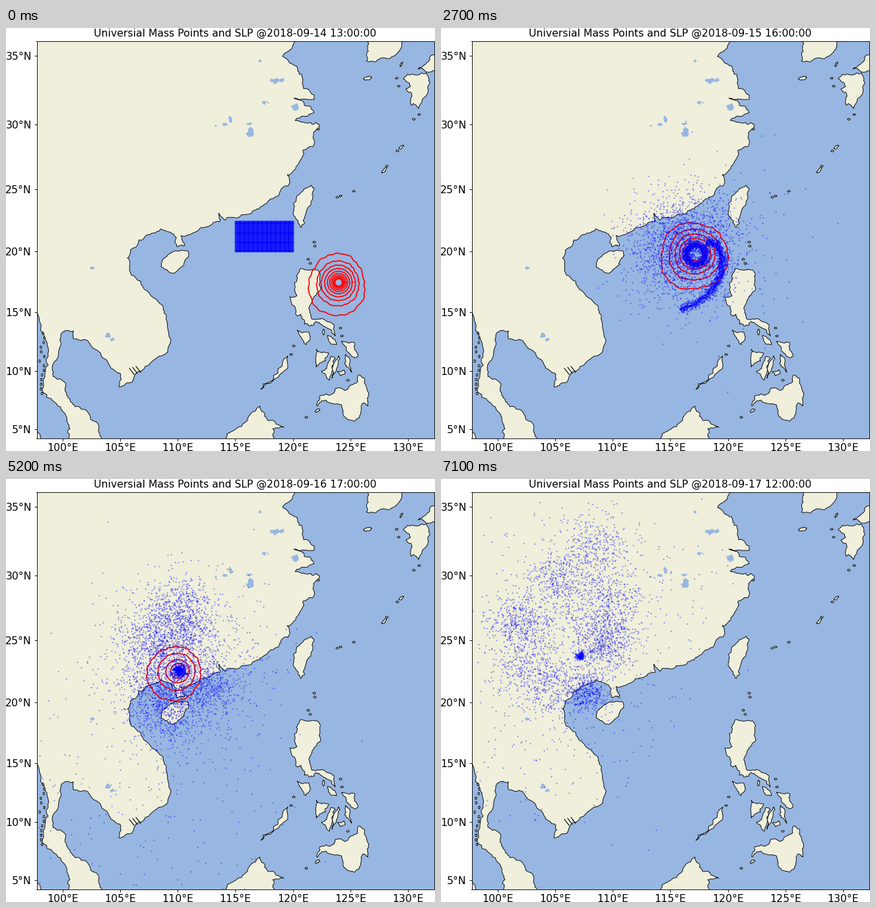
A matplotlib script for the animation above (7.2 s loop, 650 by 640 pixels).

```python
import numpy as np
import matplotlib.pyplot as plt
from matplotlib.animation import FuncAnimation

W, H, DPI = 650, 640, 80
FRAMES, INTERVAL = 72, 100
TAU = 2 * np.pi
OCEAN, LAND = "#97b6e1", "#efefdb"
rng = np.random.default_rng(7)


def lon_x(lon):
    return 86 + 17.43 * (np.asarray(lon) - 100)


def lat_y(lat):
    merc = np.log(np.tan(np.pi / 4 + np.radians(lat) / 2))
    return 607 - 998.5 * (merc - 0.0874)


# ---- map, in stage pixels ----
CHINA = [
    (30, 10), (438, 10), (438, 20), (419, 43), (433, 54), (444, 70), (451, 92),
    (467, 108), (436, 106), (460, 118), (467, 128), (438, 140), (464, 146),
    (475, 147), (466, 158), (466, 178), (450, 185), (449, 195), (434, 218),
    (426, 222), (430, 234), (415, 248), (397, 262), (383, 274), (366, 282),
    (332, 291), (322, 280), (324, 293)]
INDOCHINA = [
    (300, 302), (265, 314), (270, 330), (259, 331), (258, 317), (248, 309),
    (234, 304), (212, 314), (196, 332), (184, 348), (187, 366), (207, 391),
    (233, 417), (243, 436), (249, 470), (245, 490), (211, 512), (186, 537),
    (171, 543), (174, 524), (158, 512), (140, 489), (124, 473), (102, 470)]
MALAYA = [
    (102, 458), (86, 460), (83, 480), (70, 514), (71, 527), (82, 531), (92, 556),
    (101, 569), (119, 577), (141, 604), (146, 630), (96, 630), (97, 606), (91, 587),
    (70, 563), (55, 546), (64, 510), (62, 475), (45, 425), (30, 420)]
HAINAN = [(236, 362), (237, 351), (251, 340), (275, 337), (277, 343), (264, 363),
          (250, 371)]
TAIWAN = [(462, 238), (467, 243), (465, 254), (452, 288), (447, 302), (436, 284),
          (437, 270), (452, 243)]
LUZON = [
    (446, 364), (472, 366), (477, 395), (464, 411), (460, 430), (470, 441),
    (480, 440), (497, 449), (499, 466), (485, 453), (470, 444), (466, 450),
    (452, 448), (447, 433), (442, 436), (430, 407), (441, 405), (441, 380)]
MINDORO = [(441, 457), (459, 460), (461, 470), (455, 479)]
SAMAR = [(508, 474), (528, 476), (533, 497), (520, 492)]
LEYTE = [(514, 494), (521, 501), (524, 521), (513, 508)]
MASBATE = [(487, 465), (501, 479), (491, 476)]
PANAY = [(470, 486), (489, 492), (484, 504), (470, 513)]
NEGROS = [(492, 497), (499, 500), (490, 533), (478, 519), (486, 515)]
CEBU = [(504, 496), (506, 500), (494, 530)]
BOHOL = [(502, 520), (512, 517), (514, 523), (507, 526)]
MINDANAO = [
    (536, 525), (543, 530), (549, 556), (548, 572), (541, 567), (535, 590),
    (528, 595), (510, 582), (508, 570), (485, 563), (471, 572), (475, 557),
    (496, 553), (500, 545), (515, 548), (533, 535)]
PALAWAN = [(427, 496), (418, 512), (386, 547), (413, 528), (427, 514)]
BORNEO = [(329, 630), (335, 614), (357, 603), (372, 582), (385, 572), (387, 580),
          (397, 594), (421, 604), (404, 606), (404, 630)]
SUMATRA = [(30, 590), (46, 606), (58, 630), (30, 630)]
KOREA = [(546, 5), (548, 30), (546, 50), (560, 51), (592, 39), (601, 5)]
KYUSHU = [(602, 77), (608, 70), (637, 68), (642, 84), (625, 122), (614, 117),
          (614, 98), (606, 92), (613, 88)]
HONSHU = [(624, 62), (640, 51), (660, 38), (660, 66), (634, 64)]
# long islands: x, y, length, width, angle
LONG_ISLES = [(548, 76, 13, 5, 15), (599, 55, 8, 2, 60), (599, 180, 9, 3, 35),
              (573, 215, 11, 3, 50), (472, 579, 8, 4, 30), (481, 460, 9, 3, 90)]
SMALL_ISLES = [(626, 131), (618, 138), (593, 186), (577, 209), (502, 256), (507, 254),
               (527, 247), (467, 324), (468, 330), (458, 350), (461, 356), (436, 481),
               (432, 494), (455, 589), (507, 454), (509, 466), (473, 153), (518, 533),
               (592, 76), (595, 88)]
# lakes: x, y, length, width
LAKES = [(385, 50, 5, 4), (410, 79, 24, 8), (393, 113, 11, 4), (438, 120, 11, 10),
         (340, 138, 6, 10), (332, 146, 8, 4), (318, 148, 4, 3), (369, 145, 9, 4),
         (370, 158, 10, 17), (154, 465, 8, 8), (161, 472, 7, 5), (131, 363, 7, 4)]


def rough(points, amp=0.13, levels=3):
    """Roughen a closed outline by moving edge midpoints sideways."""
    p = np.array(points, float)
    for _ in range(levels):
        q = np.roll(p, -1, 0)
        d = q - p
        size = np.hypot(d[:, 0], d[:, 1])
        d *= (np.minimum(size, 14) / np.maximum(size, 1e-9))[:, None]
        side = np.column_stack([-d[:, 1], d[:, 0]])
        mid = (p + q) / 2 + side * rng.normal(0, amp, (len(p), 1))
        p = np.stack([p, mid], 1).reshape(-1, 2)
    return p


def oval(x, y, length, width, angle=0):
    t = np.linspace(0, TAU, 8, endpoint=False)
    u, v = length / 2 * np.cos(t), width / 2 * np.sin(t)
    a = np.radians(angle)
    return np.column_stack([x + u * np.cos(a) - v * np.sin(a),
                            y - u * np.sin(a) - v * np.cos(a)])


def draw_map(ax):
    lands = [CHINA + INDOCHINA + MALAYA, HAINAN, TAIWAN, LUZON, MINDORO, SAMAR, LEYTE,
             MASBATE, PANAY, NEGROS, CEBU, BOHOL, MINDANAO, PALAWAN, BORNEO, SUMATRA,
             KOREA, KYUSHU, HONSHU]
    lands += [oval(*isle) for isle in LONG_ISLES]
    lands += [oval(x, y, 4, 2.5) for x, y in SMALL_ISLES]
    lands += [oval(rng.uniform(51, 59), y, 2.5, 4) for y in range(462, 560, 7)]
    for pts in lands:
        ax.fill(*rough(pts).T, fc=LAND, ec="black", lw=0.8, zorder=1)
    for lake in LAKES:
        ax.fill(*rough(oval(*lake), 0.3, 2).T, fc=OCEAN, lw=0, zorder=1.2)
    for k in range(3):
        x, y = 187 + 5 * k, 515 - 1.5 * k
        ax.plot([x, x + 7], [y, y + 9], color="black", lw=1, zorder=1.3)


# ---- storm ----
KEYS = np.array([0, 11, 27, 44, 52, 63, 71])
EYE = np.array([(504, 385), (445, 375), (385, 341), (307, 299), (261, 290),
                (226, 285), (211, 267)], float)
RING_KEYS = [0, 11, 27, 44, 52, 63, 66]
# outermost isobar: radius every 45 degrees, counterclockwise from east
OUTER = np.array([
    [39, 40, 44, 43, 45, 50, 50, 46],
    [58, 53, 52, 50, 47, 46, 55, 57],
    [50, 46, 46, 50, 51, 57, 54, 53],
    [40, 40, 39, 50, 72, 72, 65, 52],
    [34, 34, 36, 40, 47, 49, 45, 38],
    [3, 5, 7, 9, 8, 7, 5, 3],
    [1] * 8], float)
# inner isobars: largest radius, ratio, smallest radius
INNER = np.array([(33, 0.8, 5), (41, 0.77, 8), (39, 0.78, 9), (38, 0.8, 12),
                  (28, 0.63, 10), (0, 0.6, 9), (0, 0.6, 9)])
ANGLE = np.linspace(0, TAU, 96, endpoint=False)


def columns_at(t, keys, table):
    return np.array([np.interp(t, keys, col) for col in table.T])


def isobars(t):
    outer = columns_at(t, RING_KEYS, OUTER)
    first, ratio, least = columns_at(t, RING_KEYS, INNER)
    shape = np.fft.irfft(np.fft.rfft(outer / outer.mean()), 96) * 12
    cx, cy = columns_at(t, KEYS, EYE)
    radii = [outer.mean(), *first * ratio ** np.arange(9)]
    curves = []
    for j, r in enumerate(radii):
        if r < (least if j else 3):
            curves.append(([], []))
            continue
        wave = sum(np.sin(k * ANGLE + k * k + 2 * j + 0.35 * t) for k in (7, 11, 17, 23))
        rad = r * (1 + (shape - 1) * 0.6 ** j) + 0.5 * 0.7 ** j * min(1, r / 30) * wave
        x, y = cx + rad * np.cos(ANGLE), cy - rad * np.sin(ANGLE)
        curves.append((np.append(x, x[0]), np.append(y, y[0])))
    return curves


# ---- mass points ----
# clouds: share, x, y, spread
CLOUD_44 = [(7, 297, 298, 5), (7, 316, 300, 6), (8, 355, 302, 12), (5, 335, 335, 15),
            (5, 280, 360, 17), (20, 300, 250, 33), (20, 300, 297, 40), (9, 235, 330, 23),
            (7, 310, 240, 65), (5, 240, 470, 100), (3, 390, 350, 60), (5, -100, 430, 60)]
CLOUD_52 = [(10, 262, 290, 5), (9, 268, 195, 24), (13, 235, 245, 30), (18, 260, 288, 46),
            (14, 240, 340, 27), (6, 310, 315, 19), (12, 275, 260, 65), (5, 230, 440, 105),
            (9, -110, 420, 65), (4, 200, 770, 60)]
CLOUD_63 = [(9, 226, 285, 2.8), (10, 158, 250, 27), (10, 215, 165, 32), (11, 230, 220, 42),
            (8, 285, 250, 29), (12, 215, 347, 20), (4, 265, 325, 23), (9, 220, 255, 72),
            (4, 210, 420, 95), (15, -110, 350, 65), (8, 160, 780, 60)]
CLOUD_71 = [(4, 211, 267, 3.1), (8, 118, 220, 22), (5, 175, 150, 21), (6, 235, 105, 24),
            (7, 130, 285, 30), (6, 170, 315, 24), (8, 220, 322, 17), (9, 248, 248, 21),
            (7, 257, 190, 28), (5, 195, 200, 39), (9, 225, 200, 90), (3, 170, 390, 85),
            (17, -120, 300, 60), (6, 130, 790, 60)]


def cloud(spec, n):
    share, *place, spread = np.array(spec).T
    part = rng.choice(len(share), n, p=share / share.sum())
    return np.array(place).T[part] + spread[part, None] * rng.normal(size=(n, 2))


def along(points, p):
    """Places and sideways unit vectors at p in 0..1 along a polyline."""
    pts = np.array(points, float)
    knots = np.linspace(0, 1, len(pts))
    tangent = np.gradient(pts, axis=0)
    pos, tan = (np.column_stack([np.interp(p, knots, a[:, i]) for i in (0, 1)])
                for a in (pts, tangent))
    tan /= np.hypot(tan[:, 0], tan[:, 1])[:, None]
    return pos, np.column_stack([-tan[:, 1], tan[:, 0]])


def polar(xy, eye):
    dx, dy = (xy - eye).T
    return np.hypot(dx, dy), np.arctan2(-dy, dx)


def rank(v):
    return np.argsort(np.argsort(v)) / (len(v) - 1)


def follow(r, th, dt, xy, eye, pair=True):
    """Turn points with the vortex until they land on the next positions."""
    R, T = polar(xy, eye)
    ahead = th + dt * np.minimum(0.9, 8 / np.maximum(r, 1))
    if pair:
        pick = np.empty(len(r), int)
        a, b = np.argsort(ahead % TAU), np.argsort(T % TAU)
        for i, j in zip(np.array_split(a, 40), np.array_split(b, 40)):
            pick[i[np.argsort(r[i])]] = j[np.argsort(R[j])]
        R, T = R[pick], T[pick]
    return R, ahead + (T - ahead + np.pi) % TAU - np.pi


def build_paths():
    lon, lat = np.meshgrid(np.linspace(115, 120, 101), np.linspace(20, 22.5, 51))
    start = np.column_stack([lon_x(lon.ravel()), lat_y(lat.ravel())])
    n = len(start)
    r, th = polar(start, EYE[0])
    path = [(r, th)]

    # grid drawn out into a streak; the nearest points lead
    near = (r.max() - r) / np.ptp(r)
    p = (near + rank(near)) / 2
    pos, side = along([(340, 311), (322, 328), (316, 350), (330, 366), (352, 378),
                       (385, 388), (415, 398), (445, 403), (468, 398), (485, 385)], p)
    half = np.interp(p, [0, 0.2, 0.6, 1], [1, 9, 16, 14])
    across = 1.6 * (rank(th) - 0.5) + rng.normal(0, 0.3, n)
    r, th = polar(pos + side * (half * across)[:, None], EYE[1])
    th %= TAU
    th[th < np.pi / 2] += TAU
    path.append((r, th))

    # tail band, eyewall ring, halo and far scatter
    q = rank(p)
    xy = cloud([(75, 368, 335, 38), (14, 390, 325, 39), (11, 390, 335, 70)], n)
    band, wall = q < 0.28, (q >= 0.28) & (q < 0.5)
    pos, side = along([(362, 425), (385, 417), (405, 402), (418, 385), (425, 365),
                       (427, 346), (418, 328), (402, 322)], q[band] / 0.28)
    xy[band] = pos + side * rng.normal(0, 3.5, (band.sum(), 1))
    a, rad = rng.uniform(0, TAU, wall.sum()), rng.normal(15, 3, wall.sum())
    xy[wall] = np.column_stack([386 + rad * np.cos(a), 343 + rad * np.sin(a)])
    path.append(follow(r, th, 16, xy, EYE[2], pair=False))

    for k, spec in enumerate((CLOUD_44, CLOUD_52, CLOUD_63, CLOUD_71), 3):
        path.append(follow(*path[-1], KEYS[k] - KEYS[k - 1], cloud(spec, n), EYE[k]))
    return np.array(path)


def points_at(t):
    k = min(np.searchsorted(KEYS, t, "right") - 1, len(KEYS) - 2)
    f = (t - KEYS[k]) / (KEYS[k + 1] - KEYS[k])
    r, th = paths[k] * (1 - f) + paths[k + 1] * f
    cx, cy = columns_at(t, KEYS, EYE)
    return np.column_stack([cx + r * np.cos(th), cy - r * np.sin(th)])


# ---- figure ----
plt.rcParams.update({"font.family": "DejaVu Sans", "font.size": 14.06})
fig = plt.figure(figsize=(W / DPI, H / DPI), dpi=DPI, facecolor="white")
L, R, T, B = 46.5, 648.5, 19.5, 620.5
ax = fig.add_axes([L / W, 1 - B / H, (R - L) / W, (B - T) / H], facecolor=OCEAN)
draw_map(ax)
ax.set(xlim=(L, R), ylim=(B, T))
lons, lats = np.arange(100, 131, 5), np.arange(5, 36, 5)
ax.set_xticks(lon_x(lons), [f"{v}°E" for v in lons])
ax.set_yticks(lat_y(lats), [f"{v}°N" for v in lats])
title = ax.set_title("", fontsize=14.06)

paths = build_paths()
rings = [ax.plot([], [], color="red", lw=1.5, zorder=3)[0] for _ in range(10)]
dots = ax.scatter(*points_at(0).T, s=3.0, color="blue", alpha=0.5, lw=0, zorder=4)


def draw(i):
    day, hour = divmod(13 + i, 24)
    title.set_text(f"Universial Mass Points and SLP @2018-09-{14 + day} {hour:02d}:00:00")
    for ring, (x, y) in zip(rings, isobars(i)):
        ring.set_data(x, y)
    dots.set_offsets(points_at(i))
    return [title, dots, *rings]


anim = FuncAnimation(fig, draw, frames=FRAMES, interval=INTERVAL, repeat=True)
plt.show()
```
